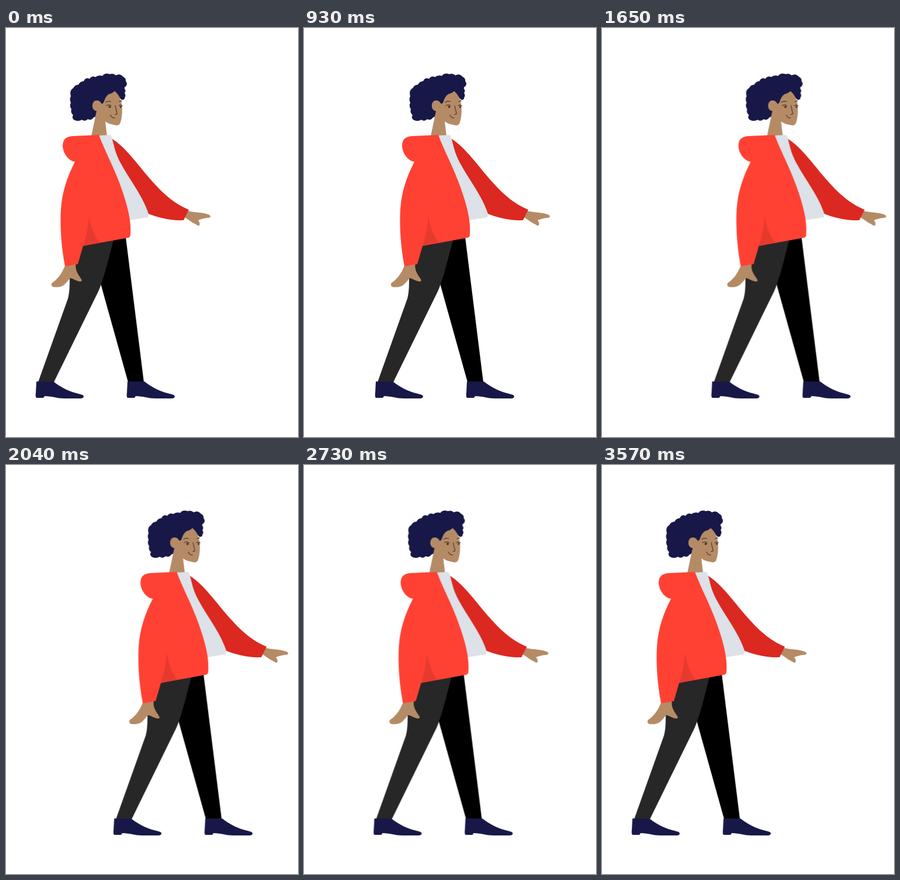
These frames come from a looping animation (500x700 px, 3.6 s). An HTML page without scripts:

```html
<!DOCTYPE html>
<html lang="en">
<head>
<meta charset="utf-8">
<title>Walker</title>
<style>
  html, body { margin: 0; width: 100%; height: 100%; overflow: hidden; background: #fff; }
  svg { display: block; width: 500px; height: 700px; }
  .walker { animation: glide 1.8s cubic-bezier(.35, 0, .68, 1) infinite; animation-duration: 3.6s; }
  .navy { fill: #181848; }
  .skin { fill: #b58b66; }
  .red { fill: #ff4133; }
  .dark-red { fill: #db2820; }
  .line { fill: none; stroke: #59463a; stroke-width: 1.5; stroke-linecap: round; }
  @keyframes glide {
    0%, 100% { transform: translateX(0); }
    50% { transform: translateX(139.5px); }
  }
</style>
</head>
<body>
<svg viewBox="0 0 500 700">
  <defs>
    <path id="shoe" class="navy" d="M52 605H81C95 616 110 623 128 627Q133 628 133 631Q132 634 128 634H100C87 634 79 630 66 630L64 633H52Q50 631 51 624Z"/>
  </defs>
  <g class="walker">
    <!-- legs -->
    <path d="M165 362L205 358L236 606H209L161 434Z"/>
    <path fill="#272727" d="M125 368L185 360C176 391 167 436 154 459L82 606H55L106 463C109 452 109 440 109 425Z"/>
    <use href="#shoe"/>
    <use href="#shoe" x="156"/>

    <!-- far arm -->
    <path class="skin" d="M311 313C324 316 335 315 346 319Q350 320 350 323Q349 325 344 325C338 326 333 327 329 329Q333 334 331 338Q329 339 325 336C318 333 313 328 306 324Z"/>
    <path class="dark-red" d="M179 188C206 204 229 239 250 262C272 287 290 301 313 311L304 329C283 330 261 325 241 317L195 240Z"/>

    <!-- head -->
    <path class="navy" d="M166 130L155 141Q156 152 150 153Q146 159 140 156Q135 161 130 157Q123 161 116 157Q112 153 115 149Q110 145 112 139Q108 133 111 128Q108 121 111 117Q108 107 115 103Q118 97 124 97Q127 91 133 91Q136 84 143 87Q147 81 153 84Q158 80 165 82Q169 76 178 79Q184 77 188 81Q195 77 200 83Q206 86 205 91Q209 95 205 100Q202 101 203 104Q206 108 203 111Q206 116 203 119Q204 123 198 123L188 112Z"/>
    <path class="skin" d="M186 108C192 113 197 121 198 130C200 144 198 157 195 164Q192 168 186 166C179 165 174 163 170 160L173 185H146L155 142C145 141 146 124 155 124Q160 123 164 130Q167 129 168 125C171 117 174 113 180 112Q184 110 186 108Z"/>
    <path class="line" d="M171 127Q175 124 179 126M194 126Q196 124 198 125M172 133Q176 130 180 133M193 133Q196 131 199 133M187 133C188 139 190 144 190 147L187 148M179 149Q181 154 186 154"/>
    <g fill="#44372f"><circle cx="177.500" cy="135" r="2"/><circle cx="196.500" cy="135" r="1.700"/></g>

    <!-- torso -->
    <path fill="#dde1e8" d="M158 184L179 183C184 192 184 206 193 225C209 257 234 286 244 318L243 324L211 329Z"/>
    <path class="skin" d="M102 405L120 402C117 414 124 422 129 430Q131 434 127 434C120 433 115 429 110 428C104 435 99 442 92 443Q85 444 80 443Q76 440 79 436C87 431 95 421 99 411Z"/>
    <path class="red" d="M159 183C169 210 184 237 196 270C208 303 215 331 213 354Q213 358 209 359L132 373L123 404L101 408C95 377 92 340 94 310C96 280 105 254 118 229C106 227 97 213 97 201Q97 186 114 185Z"/>
    <path fill="#e63a2f" d="M142 322Q147 352 160 367L132 373Q140 350 142 322Z"/>
  </g>
</svg>
</body>
</html>
```
